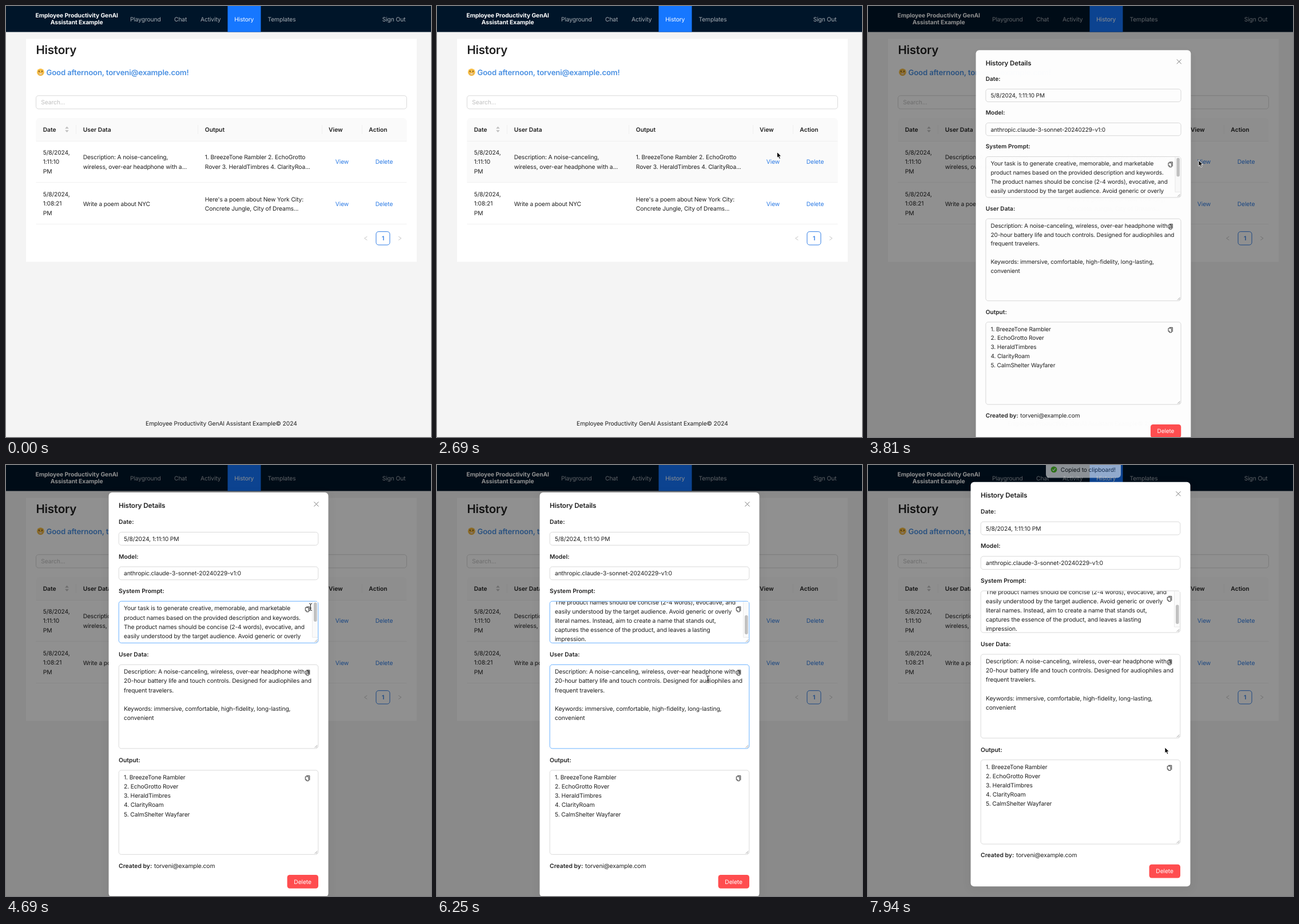
Recreate the animation shown at these times as an HTML page. Size 743x754 px, loop 8 s.

```html
<!DOCTYPE html>
<html lang="en">
<head>
<meta charset="utf-8">
<title>History details</title>
<style>
  html, body { margin: 0; width: 100%; height: 100%; overflow: hidden; background: #f4f4f4; }
  svg { display: block; width: 743px; height: 754px; }
  text { font-family: Inter, "Open Sans", sans-serif; white-space: pre; text-rendering: geometricPrecision; }
</style>
</head>
<body>
<script>
const LOOP = 8000, STEP = 62.5;
const INK = '#1f1f1f', BLUE = '#1677ff', LINK = '#2c7be5', LINE = '#f0f0f0', EDGE = '#d9d9d9', HOVER = '#69b1ff';
const MAIL = 'torveni@example.com';
const NAMES = ['BreezeTone Rambler', 'EchoGrotto Rover', 'HeraldTimbres', 'ClarityRoam', 'CalmShelter Wayfarer'];

// ---- drawing helpers ----
function el(parent, tag, attrs = {}) {
  const node = document.createElementNS('http://www.w3.org/2000/svg', tag);
  for (const key in attrs) node.setAttribute(key, attrs[key]);
  parent.appendChild(node);
  return node;
}
const group = (parent, attrs) => el(parent, 'g', attrs);
const box = (parent, x, y, x2, y2, fill, rx = 0, stroke = 'none') =>
  el(parent, 'rect', { x, y, width: x2 - x, height: y2 - y, fill, rx, stroke });
const path = (parent, d, stroke, width = 1, fill = 'none') =>
  el(parent, 'path', { d, stroke, fill, 'stroke-width': width });

// cy is the middle of the capital letters
function text(parent, x, cy, str, { size = 10.3, weight = 400, fill = INK, anchor = 'start', track = -0.012 } = {}) {
  const node = el(parent, 'text', {
    x, y: cy + size * 0.364, fill, 'font-size': size, 'font-weight': weight,
    'text-anchor': anchor, 'letter-spacing': size * track
  });
  node.textContent = str;
  return node;
}
const lines = (parent, x, cy, list, opts) =>
  list.forEach((str, i) => text(parent, x, cy + i * 16.17, str, opts));

// ---- page ----
const svg = el(document.body, 'svg', { viewBox: '0 0 743 754' });
box(svg, 0, 0, 743, 754, '#f4f4f4');
const page = group(svg);

function drawNav() {
  box(page, 0, 0, 743, 45.5, '#001529');
  box(page, 387.5, 0, 445.5, 45.5, BLUE);
  const brand = { weight: 700, fill: '#fff', anchor: 'middle', track: -0.008 };
  text(page, 123.7, 16.5, 'Employee Productivity GenAI', brand);
  text(page, 123.7, 28.7, 'Assistant Example', brand);
  const items = { Playground: 217, Chat: 294, Activity: 340, History: 399.3, Templates: 457.5, 'Sign Out': 657.7 };
  for (const name in items)
    text(page, items[name], 23, name, { fill: name === 'History' ? '#fff' : '#a6adb4' });
}

function drawFace() {
  el(page, 'circle', { cx: 60.4, cy: 115.8, r: 6.4, fill: '#f6bd45' });
  for (const cx of [57.8, 63]) el(page, 'ellipse', { cx, cy: 114.2, rx: 0.9, ry: 1.3, fill: '#6b4415' });
  el(page, 'ellipse', { cx: 60.4, cy: 118.6, rx: 3.2, ry: 1.6, fill: '#fbe6c0', stroke: '#b8792a', 'stroke-width': 0.6 });
}

let rows;
function drawTable() {
  path(page, 'M52.5 236.5V202a6 6 0 0 1 6-6H694.5a6 6 0 0 1 6 6V236.5Z', 'none', 0, '#fafafa');
  rows = [box(page, 52.5, 236.5, 700.5, 308.5, '#fff'), box(page, 52.5, 309, 700.5, 381.5, '#fff')];
  for (const y of [236.5, 308.5, 381.5]) path(page, `M52.5 ${y}H700.5`, LINE);
  for (const x of [122.5, 335.5, 552.5, 622.5]) path(page, `M${x} 208V224`, LINE);
  const heads = { Date: 64.7, 'User Data': 134.7, Output: 347.8, View: 564, Action: 634.3 };
  for (const name in heads) text(page, heads[name], 216, name, { weight: 600, track: 0 });
  path(page, 'M103.2 214.6L106.5 210.8L109.8 214.6ZM103.2 217.2L106.5 221L109.8 217.2Z', 'none', 0, '#bfbfbf');

  lines(page, 64.7, 256.5, ['5/8/2024,', '1:11:10', 'PM']);
  lines(page, 64.7, 329.5, ['5/8/2024,', '1:08:21', 'PM']);
  lines(page, 134.7, 264.7, ['Description: A noise-canceling,', 'wireless, over-ear headphone with a...']);
  text(page, 134.7, 346, 'Write a poem about NYC');
  lines(page, 347.8, 264.7, [
    `1. ${NAMES[0]} 2. ${NAMES[1].split(' ')[0]}`,
    `${NAMES[1].split(' ')[1]} 3. ${NAMES[2]} 4. ${NAMES[3].slice(0, -1)}...`
  ]);
  lines(page, 347.8, 338, ["Here's a poem about New York City:", 'Concrete Jungle, City of Dreams...']);
  for (const y of [272.7, 346]) {
    text(page, 575.8, y, 'View', { fill: LINK });
    text(page, 645.8, y, 'Delete', { fill: LINK });
  }
}

function drawPage() {
  drawNav();
  box(page, 35, 57.5, 718, 447.5, '#fff');
  text(page, 52.5, 77, 'History', { size: 20.6, weight: 600 });
  drawFace();
  text(page, 70.5, 115.7, `Good afternoon, ${MAIL}!`, { size: 13.2, weight: 600, fill: '#4a90e2' });
  box(page, 52.5, 156.8, 700.5, 180, '#fff', 4.4, EDGE);
  text(page, 61.3, 168.5, 'Search...', { fill: '#bfbfbf' });
  drawTable();
  box(page, 647, 394.7, 671, 418, '#fff', 4.4, LINK);
  text(page, 659, 406.5, '1', { weight: 600, fill: LINK, anchor: 'middle' });
  path(page, 'M631.4 403.2L626.6 406.4L631.4 409.6M686.2 403.2L691 406.4L686.2 409.6', '#bfbfbf', 0.9);
  text(page, 376.4, 730.3, 'Employee Productivity GenAI Assistant Example© 2024', { anchor: 'middle' });
}
drawPage();

// ---- modal, laid out where its top edge is at 48 ----
const mask = box(svg, 0, 0, 743, 754, '#000');
const modal = group(svg);
const PROMPT = [
  'Your task is to generate creative, memorable, and marketable',
  'product names based on the provided description and keywords.',
  'The product names should be concise (2-4 words), evocative, and',
  'easily understood by the target audience. Avoid generic or overly',
  'literal names. Instead, aim to create a name that stands out,',
  'captures the essence of the product, and leaves a lasting',
  'impression.'
];
const DETAILS = [
  'Description: A noise-canceling, wireless, over-ear headphone with a',
  '20-hour battery life and touch controls. Designed for audiophiles and',
  'frequent travelers.', '',
  'Keywords: immersive, comfortable, high-fidelity, long-lasting,',
  'convenient'
];

const field = (y, y2) => box(modal, 197.2, y, 545.8, y2, '#fff', 4.4, EDGE);
const grip = y => path(modal, `M539.8 ${y - 1.5}L544.3 ${y - 6}M542.4 ${y - 1.5}L544.3 ${y - 3.4}`, '#777', 0.7);
function copyIcon(y) {
  path(modal, `M525 ${y - 4.4}H530.8V${y + 3.4}`, '#333', 1);
  path(modal, `M523.3 ${y - 2.8}H529V${y + 4.6}H525.6L523.3 ${y + 2.4}Z`, '#333', 1);
  path(modal, `M525.8 ${y + 4.4}V${y + 2.1}H523.4`, '#333', 0.7);
}

el(modal, 'rect', { x: 179.5, y: 48, width: 384, height: 707.5, rx: 6, fill: '#fff',
  style: 'filter:drop-shadow(0 4px 8px rgba(0,0,0,.06))' });
text(modal, 197, 71.2, 'History Details', { size: 11.8, weight: 600 });
path(modal, 'M538.5 64.5L546.5 72.5M546.5 64.5L538.5 72.5', '#777', 1);
const labels = { 'Date:': 99.3, 'Model:': 159.8, 'System Prompt:': 220.2, 'User Data:': 331, 'Output:': 516, 'Created by:': 700.8 };
for (const name in labels) text(modal, 197, labels[name], name, { weight: 600, track: 0.004 });
field(117.5, 140.3);
text(modal, 206, 129.2, '5/8/2024, 1:11:10 PM');
field(178, 200.8);
text(modal, 206, 189.7, 'anthropic.claude-3-sonnet-20240229-v1:0');

const promptBox = field(238.3, 311.3);
el(el(svg, 'clipPath', { id: 'promptClip' }), 'rect', { x: 198, y: 239, width: 346, height: 71.8 });
const promptText = group(group(modal, { 'clip-path': 'url(#promptClip)' }));
lines(promptText, 206, 250.7, PROMPT);
box(modal, 535.3, 239.2, 545, 301.5, '#fafafa');
path(modal, 'M535.5 239V301.5H545', '#e6e6e6', 0.8);
const thumb = box(modal, 538, 240.5, 543.6, 274, '#c1c1c1', 2.8);
grip(311.3);
copyIcon(252.3);

const detailBox = field(349.3, 496);
lines(modal, 206, 361.5, DETAILS);
grip(496);
copyIcon(363.3);

field(534, 681.3);
lines(modal, 206, 546.2, NAMES.map((name, i) => `${i + 1}. ${name}`));
grip(681.3);
copyIcon(548);

text(modal, 259, 700.8, MAIL);
box(modal, 491.6, 717, 546, 740.7, '#ff4d4f', 4.4);
text(modal, 518.6, 728.8, 'Delete', { fill: '#fff', anchor: 'middle' });

// ---- toast ----
const toast = group(svg);
box(toast, 311, 11.8, 442, 41.3, '#fff', 6);
el(toast, 'circle', { cx: 325, cy: 26.6, r: 5.4, fill: '#52c41a' });
path(toast, 'M322.4 26.8L324.3 28.8L327.7 24.4', '#fff', 1.2);
text(toast, 336.8, 26.6, 'Copied to clipboard!');

// ---- pointers ----
const arrow = group(svg);
path(arrow, 'M0 0V10.2L2.3 8.1L4 12L5.9 11.2L4.2 7.4H7.4Z', '#fff', 0.9, '#000');
const beam = group(svg);
const BEAM = 'M-2.4 -6Q0 -6 0 -4.6V4.6Q0 6 -2.4 6M2.4 -6Q0 -6 0 -4.6M0 4.6Q0 6 2.4 6M-1.4 1.8H1.4';
path(beam, BEAM, '#fff', 2);
path(beam, BEAM, '#111', 1);

// ---- motion ----
const TRACK = [
  [2000, 648, 722], [2310, 630, 455], [2690, 594.5, 255.5], [3060, 593, 259], [3250, 590, 262],
  [3560, 589, 263], [3690, 582.5, 265.5], [3810, 578, 270], [4250, 576, 272], [4690, 532.5, 248.5],
  [4880, 530, 254], [5690, 522, 272], [5880, 490, 345], [6200, 473.5, 375], [6440, 473.5, 375],
  [7250, 527, 346], [7690, 527, 346], [7940, 519, 494]
];
const clamp = v => Math.min(1, Math.max(0, v));
const smooth = v => (v = clamp(v), v * v * (3 - 2 * v));
const ramp = (t, from, to) => smooth((t - from) / (to - from));

function pointerAt(t) {
  let i = TRACK.findIndex(k => k[0] > t);
  if (i < 0) i = TRACK.length - 1;
  const [t0, x0, y0] = TRACK[Math.max(0, i - 1)], [t1, x1, y1] = TRACK[i];
  const k = t1 > t0 ? smooth((t - t0) / (t1 - t0)) : 0;
  return [x0 + (x1 - x0) * k, y0 + (y1 - y0) * k];
}

function draw(t) {
  const [px, py] = pointerAt(t);
  const since = t - 3613, open = since > 0;

  rows.forEach((row, i) => {
    const top = 236.5 + i * 72.5;
    const over = t >= 2000 && !open && py >= top && py < top + 72.5;
    row.setAttribute('fill', over ? '#fafafa' : '#fff');
  });

  const grow = open ? 1 - Math.exp(-since / 55) : 0;
  const scale = grow > 0.995 ? 1 : 0.2 + 0.8 * grow;
  const drop = 25.3 - 25.3 * ramp(t, 3870, 4180) - 18.2 * ramp(t, 6500, 7100);
  mask.setAttribute('opacity', 0.435 * clamp(since / 200));
  modal.setAttribute('opacity', scale === 1 ? 1 : grow ** 0.65);
  modal.setAttribute('transform', `translate(605 260) scale(${scale}) translate(-605 ${drop - 260})`);

  const scrolled = ramp(t, 5130, 5700);
  promptText.setAttribute('transform', `translate(0 ${-43 * scrolled})`);
  thumb.setAttribute('y', 240.5 + 22.3 * scrolled);
  promptBox.setAttribute('stroke', t > 4560 && t < 7250 ? HOVER : EDGE);
  detailBox.setAttribute('stroke', t > 5930 && t < 7690 ? HOVER : EDGE);

  const shown = ramp(t, 7778, 8078);
  toast.setAttribute('opacity', shown);
  toast.setAttribute('transform', `translate(0 ${-41.3 * (1 - shown)})`);

  const y = py - drop;
  const typing = open && px > 197 && px < 546 && ((y > 238 && y < 311) || (y > 349 && y < 496));
  arrow.setAttribute('visibility', t >= 2000 && !typing ? 'visible' : 'hidden');
  beam.setAttribute('visibility', typing ? 'visible' : 'hidden');
  for (const g of [arrow, beam]) g.setAttribute('transform', `translate(${px} ${py})`);
}

const start = performance.now();
function tick() {
  const t = (performance.now() - start) % LOOP;
  draw(Math.floor((t + 5) / STEP) * STEP);
  requestAnimationFrame(tick);
}
draw(0);
requestAnimationFrame(tick);
</script>
</body>
</html>
```
